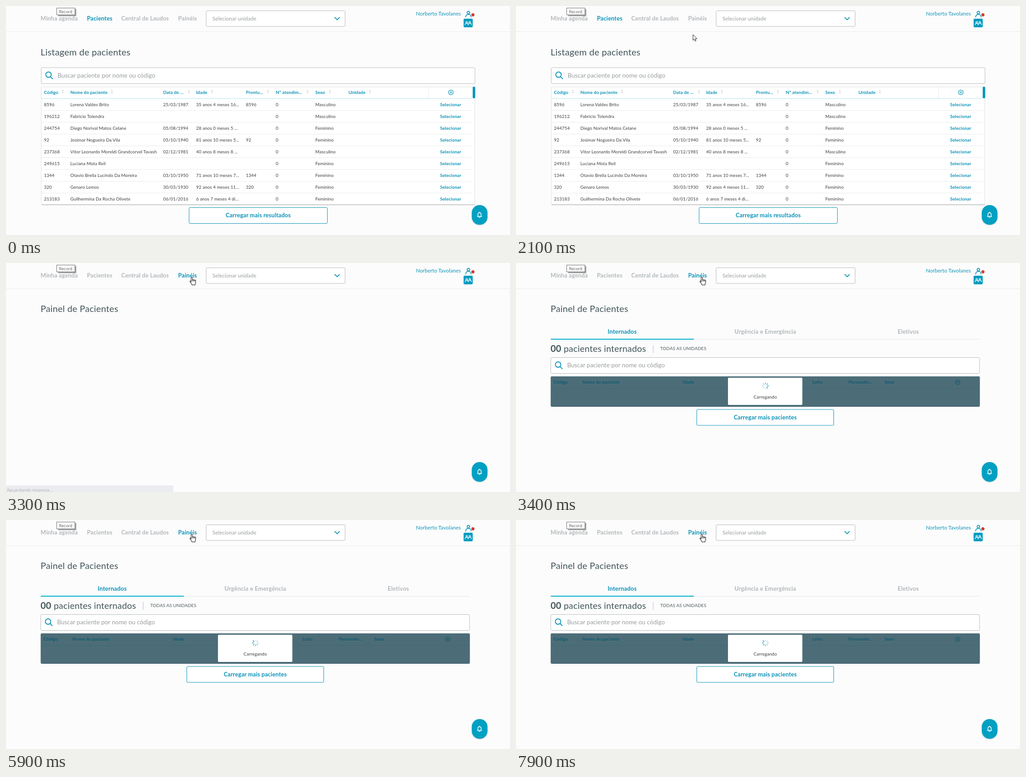
Recreate the animation shown at these times as an HTML page. Size 1108 by 505 pixels, loop 8000 ms.

```html
<!DOCTYPE html>
<html lang="pt-BR">
<head>
<meta charset="utf-8">
<title>Painel de pacientes</title>
<style>
  html, body { margin: 0; width: 100%; height: 100%; overflow: hidden; background: #fcfcfc; }
  svg { display: block; width: 100vw; height: 100vh; }
  text { font-family: Lato, "Open Sans", sans-serif; letter-spacing: .01em; white-space: pre; }
  .ui { font-family: "Open Sans", "Noto Sans", sans-serif; letter-spacing: 0; }
  .b { font-weight: 700; }
</style>
</head>
<body>
<svg id="stage" viewBox="0 0 1108 505"></svg>
<script>
const BLUE = '#0b93b8', GREY = '#b3b8bb', DARK = '#3d3d3d', TITLE = '#43565b', HINT = '#969a9c';
const stage = document.getElementById('stage');

// Drawing helpers, all returning SVG markup
const text = (x, y, s, size, fill, cls = '', anchor = 'start') =>
  `<text x="${x}" y="${y}" font-size="${size}" fill="${fill}" class="${cls}" text-anchor="${anchor}">${s}</text>`;
const rect = (x, y, w, h, fill, r = 0, stroke = 'none') =>
  `<rect x="${x}" y="${y}" width="${w}" height="${h}" rx="${r}" fill="${fill}" stroke="${stroke}"/>`;
const path = (d, stroke, width = 1, fill = 'none') =>
  `<path d="${d}" stroke="${stroke}" stroke-width="${width}" fill="${fill}" stroke-linejoin="round" stroke-linecap="round"/>`;
const at = (x, y, s) => `<g transform="translate(${x} ${y})">${s}</g>`;
const group = (id, s) => `<g id="${id}">${s}</g>`;

const sortMark = x => path(`M${x - 2.2} 187.5h4.4l-2.2-2.5zM${x - 2.2} 190h4.4l-2.2 2.5z`, 'none', 0, '#c6c9cb');
const gear = (x, y, color) => at(x, y,
  path('M-2 -4.6L0 -5.2 2 -4.6 4.6 -3 4.9 0 4.6 3 2 4.6 0 5.2-2 4.6-4.6 3-4.9 0-4.6-3z', color, 1.2) +
  `<circle r="1.7" fill="none" stroke="${color}" stroke-width="1.1"/>`);
const person = (color, w) => path('M-2.9-3.4a2.9 2.9 0 1 1 5.8 0a2.9 2.9 0 1 1-5.8 0M-6 6.3c0-8 12-8 12 0', color, w);
const searchBox = (x, y, w) => at(x, y,
  rect(.5, .5, w, 35, '#fff', 2, '#b9bcbd') +
  path('M10.5 16a6 6 0 1 1 12 0a6 6 0 1 1-12 0M20.8 20.3L25.5 25', BLUE, 1.8) +
  text(36.5, 22, 'Buscar paciente por nome ou código', 13.2, HINT));
const button = (x, y, w, label) =>
  rect(x + .5, y + .5, w, 35, '#fff', 2, BLUE) + text(x + w / 2 + .5, y + 22, label, 12.8, BLUE, 'b', 'middle');

const nav = [[76, 'Minha agenda'], [178, 'Pacientes'], [253.5, 'Central de Laudos'], [378.5, 'Painéis']];
const header =
  rect(0, 56, 1108, 1, '#ebecec') +
  group('nav', nav.map(([x, s]) => text(x, 32, s, 12.8, GREY, 'b')).join('')) +
  rect(440, 10.5, 305.5, 34.5, '#fff', 2, '#b5b8b9') +
  text(454, 32, 'Selecionar unidade', 11.4, HINT) +
  path('M723 25.3l5 5 5-5', BLUE, 1.9) +
  text(1000, 21, 'Norberto Tavolanes', 11.3, BLUE, '', 'end') +
  at(1016.5, 18, person(BLUE, 1.7)) +
  '<circle cx="1026.5" cy="19.5" r="3.4" fill="#d8392b"/>' +
  rect(1006, 28, 20, 19, '#009cc0', 2) +
  at(1012.8, 38, `<g transform="scale(.6)">${person('#fff', 2.1)}</g>`) +
  at(1019.6, 37.6, `<g transform="scale(.6)">${person('#fff', 2.1)}</g>`) +
  rect(114.5, 6.5, 40, 16, 'rgba(0,0,0,.35)') +
  rect(111.5, 4.5, 40, 15, '#fff', 0, '#6f6f6f') +
  text(116.5, 16, 'Record', 9, '#575757', 'ui');

const cols = [83.5, 141.5, 345.5, 418, 527.5, 593, 680];
const heads = ['Código', 'Nome do paciente', 'Data de ...', 'Idade', 'Prontu...', 'Nº atendim...', 'Sexo', 'Unidade'];
const rows = [
  '8596|Lorena Valdes Brito|25/03/1987|35 anos 4 meses 16...|8596|0|Masculino',
  '196212|Fabricio Tolendra||||0|Masculino',
  '244754|Diego Norival Matos Celane|05/08/1994|28 anos 0 meses 5 ...||0|Feminino',
  '92|Josimar Nogueira Da Vila|05/10/1940|81 anos 10 meses 5...|92|0|Feminino',
  '237368|Vitor Leonardo Moreldi Grandcorvel Tavash|02/12/1981|40 anos 8 meses 8 ...||0|Masculino',
  '249615|Luciana Mota Reil||||0|Feminino',
  '1344|Otavio Brella Lucindo Da Moreira|03/10/1950|71 anos 10 meses 7...|1344|0|Feminino',
  '320|Genaro Lemos|30/03/1930|92 anos 4 meses 11...|320|0|Feminino',
  '213183|Guilhermina Da Rocha Olivete|06/01/2016|6 anos 7 meses 4 di...||0|Feminino'
];
const list =
  text(76, 109, 'Listagem de pacientes', 20, TITLE) +
  searchBox(77, 135.5, 953.5) +
  rect(78, 437, 953, 3, 'rgba(0,0,0,.08)', 1) +
  rect(77.5, 178.5, 953, 259, '#fff', 2, '#dfe1e2') +
  heads.map((s, i) => text(cols[i] || 753, 194, s, 9.85, BLUE, 'b')).join('') +
  [125, 233, 402, 452.5, 576, 663, 712, 800].map(sortMark).join('') +
  rect(928, 179, 1, 25, '#e9ebec') + gear(978, 190.5, BLUE) +
  rect(78, 203.5, 948, 1, '#b5dfec') +
  rows.map((row, i) => {
    const y = 221 + 26 * i;
    return row.split('|').map((s, c) => text(cols[c], y, s, 9.8, DARK)).join('') +
      text(977.5, y - .5, 'Selecionar', 9.85, BLUE, 'b', 'middle') +
      (i < 8 ? rect(78, y + 9, 948, 1, '#e9ebec') : '');
  }).join('') +
  rect(78, 437, 953, 1.5, '#c9cccd') +
  rect(1026, 178, 5.5, 25.5, '#0095ba', 2) +
  button(402, 444, 304, 'Carregar mais resultados');

const dim = '#0e5a72';
const panelHeads = [[82.5, 'Código'], [146, 'Nome do paciente'], [367, 'Idade'], [651.5, 'Leito'],
  [731, 'Permanên...'], [810, 'Sexo']];
const panel =
  text(233.5, 155.5, 'Internados', 13.1, BLUE, 'b', 'middle') +
  text(548, 155.5, 'Urgência e Emergência', 13.1, GREY, 'b', 'middle') +
  text(862.5, 155.5, 'Eletivos', 13.1, GREY, 'b', 'middle') +
  rect(391, 168, 628, 1, '#e4e6e7') + rect(76.5, 167, 314.5, 2, '#00b0cb') +
  text(76, 195.5, '00', 20, TITLE, 'b') + text(105, 195.5, 'pacientes internados', 19.5, TITLE) +
  rect(301, 181, 1, 17, '#b9bdbf') +
  text(317, 192, 'TODAS AS UNIDADES', 9.9, '#4f5c60') +
  searchBox(76, 208, 942.5) +
  rect(76.5, 250.5, 943, 66.5, '#3f5e69', 2) + rect(76.5, 250, 943, 66, '#4c6d78', 2) +
  rect(77, 276, 942, 1, '#3f6673') +
  panelHeads.map(([x, s]) => text(x, 266, s, 9.85, dim, 'b')).join('') + gear(971, 263, dim) +
  rect(466, 253, 163.5, 60, '#fff', 2) +
  group('spinner', Array.from({ length: 8 }, (_, i) =>
    `<path d="M548.2 267.3V263.6" stroke="${BLUE}" stroke-width="1.7" transform="rotate(${i * 45} 548.2 271)"/>`).join('')) +
  text(548, 299, 'Carregando', 9.9, DARK, '', 'middle') +
  button(397, 322.5, 301, 'Carregar mais pacientes');

const bell =
  rect(1022.5, 438.5, 37, 46, 'rgba(0,0,0,.08)', 18) + rect(1024, 439, 34.5, 43.5, '#00a0c2', 17) +
  path('M1036.3 464.3h9.4M1037.5 464v-4.6c0-5 7-5 7 0v4.6M1041 454.6v.8', '#fff', 1.5) +
  path('M1039.8 466.2h2.4', '#fff', 1.6);

stage.innerHTML =
  rect(0, 0, 1108, 505, '#fcfcfc') + header + group('list', list) +
  group('title', text(76, 108, 'Painel de Pacientes', 19.8, TITLE)) + group('panel', panel) + bell +
  group('status', path('M0 490.5H365q3 0 3 3V505H0z', 'none', 0, '#dadde4') +
    text(2, 503.5, 'Aguardando resposta...', 9.3, '#5f6368', 'ui')) +
  group('arrow', path('M.5.5V12.6L3.3 10l2 4.6 2-.9-2-4.4H9z', '#222', 1, '#fff')) +
  group('hand', path('M3.5 12V2.2a1.4 1.4 0 0 1 2.8 0V7.6a1.3 1.3 0 0 1 2.5.2a1.3 1.3 0 0 1 2.4.5' +
    'a1.2 1.2 0 0 1 2.3.6V13q0 2-1.5 3.5v2H5.2V17L1 11.4a1.3 1.3 0 0 1 2.1-1.5z', '#222', 1.1, '#fff') +
    path('M6.3 7.6v3M8.8 8v2.6M11.2 8.4v2.2', '#222', .9));

const el = id => document.getElementById(id);
const [listEl, titleEl, panelEl, status, arrow, hand] =
  ['list', 'title', 'panel', 'status', 'arrow', 'hand'].map(el);
const spokes = [...el('spinner').children], links = el('nav').children;
const show = (node, on) => node.setAttribute('opacity', Number(on));
const move = (node, x, y) => node.setAttribute('transform', `translate(${x.toFixed(1)} ${y.toFixed(1)})`);

function bezier(u, pts) {
  const v = 1 - u, k = [v * v * v, 3 * v * v * u, 3 * v * u * u, u * u * u];
  return [0, 1].map(axis => pts.reduce((sum, p, i) => sum + k[i] * p[axis], 0));
}

function arrowAt(t) {
  if (t >= 400 && t < 1000) return bezier((t - 400) / 500, [[95, 0], [-30, 40], [40, 230], [314, 210]]);
  if (t >= 1200 && t <= 2000)
    return bezier(1 - (1 - (t - 1200) / 800) ** 1.5, [[560, 250], [760, 300], [880, 180], [435, 92]]);
  if (t >= 2100 && t < 2500) {
    const u = Math.max(0, (t - 2200) / 200);
    return [388.5 + 11 * u, 63 - 21 * u];
  }
  return null;
}

function draw(now) {
  const t = Math.floor(now % 8000 / 100) * 100;
  const loaded = t >= 3300, pos = arrowAt(t);
  show(listEl, !loaded);
  show(titleEl, loaded);
  show(panelEl, t >= 3400);
  nav.forEach((_, i) => links[i].setAttribute('fill', i === (loaded ? 3 : 1) ? BLUE : GREY));
  show(status, t < 2900 || t >= 3400 ? 0 : t === 2900 || loaded ? .5 : 1);
  show(arrow, !!pos);
  if (pos) move(arrow, ...pos);
  show(hand, t >= 2500);
  move(hand, t < 2700 ? 404 : 403.5, t < 2700 ? 31 : 30);
  spokes.forEach((s, i) => show(s, 1 - (t / 1000 + 1 - i / 8) % 1 * .9));
}

function loop() {
  draw(performance.now());
  requestAnimationFrame(loop);
}
loop();
</script>
</body>
</html>
```
